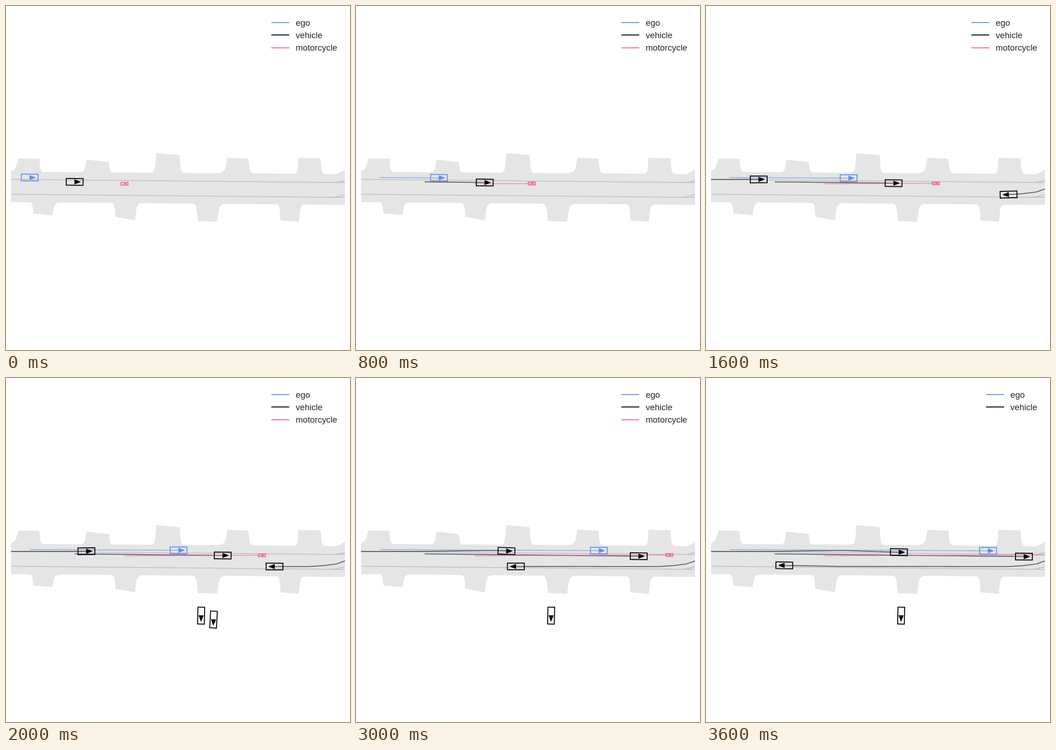
Write an HTML page with a canvas that moves like this. It is 748x748 px and loops after 3800 ms.

```html
<!DOCTYPE html>
<html lang="en">
<head>
<meta charset="utf-8">
<title>Traffic scene</title>
<style>
  html, body { margin: 0; width: 100%; height: 100%; overflow: hidden; background: #fff; }
  canvas { display: block; }
</style>
</head>
<body>
<canvas id="stage" width="748" height="748"></canvas>
<script>
const ctx = document.getElementById('stage').getContext('2d');
const STEP = 200, STEPS = 19, SPAN = 6;
const LEFT = 11, RIGHT = 737;
const BLUE = '#6190e8', BLACK = '#000', PINK = '#f9609f';

const car = { w: 36.6, h: 14.6, color: BLACK };
const bike = { w: 15.2, h: 5.8, color: PINK };

// xs: position at every SPAN steps; route: the line followed across the road.
const movers = [
  { ...car, xs: [149.3, 344, 531.3, 691.3], route: [[149, 382.4], [691, 388.3]] },
  { ...car, xs: [-125.5, 54.5, 235.5, 419.5],
    route: [[-126, 377.5], [150, 377], [294, 375], [387, 378], [420, 378.7]] },
  { ...car, xs: [816, 718.3, 498, 170.3],
    route: [[820, 369], [718, 404.5], [691, 408], [659, 410], [293, 409.7], [170, 407.4]] },
  { ...bike, xs: [257.8, 441.5, 609.5, 745], route: [[258, 386.5], [749, 384.6]] },
  { ...car, color: BLUE, xs: [51.5, 245, 438.3, 613.3], route: [[51, 373], [613, 375.8]] }
];
const parked = [
  { ...car, x: 424.3, y: 516.7, angle: 1.593, until: STEPS },
  { ...car, x: 451.3, y: 525.2, angle: 1.625, until: 15 }
];
const PARKED_FROM = 10;

// Driveways: start on the kerb, two outer corners, end on the kerb.
const kerbTop = x => 360.5 + 0.0066 * x;
const kerbBottom = x => 426.3 + 0.0085 * x;
const above = [
  [-4, 27.5, 331.5, 72.5, 332.3, 82],
  [162, 174.5, 334, 223.5, 339.3, 233],
  [315, 327, 320, 377.5, 324.3, 387],
  [460, 481.5, 330, 527, 332, 539],
  [627, 636, 330.3, 683.7, 331.3, 694]
];
const below = [
  [650, 636.8, 469.3, 597, 466, 588],
  [477, 459, 469, 417.5, 467.5, 404],
  [296, 280.5, 466, 238, 458.5, 229],
  [118, 101, 455, 59.5, 451, 51]
];

function addDriveway(path, kerb, [a, x1, y1, x2, y2, b]) {
  const mix = (p, q, u) => p + (q - p) * u;
  const ya = kerb(a), yb = kerb(b);
  path.lineTo(a, ya);
  path.quadraticCurveTo(mix(a, x1, 0.7), ya, mix(a, x1, 0.82), mix(ya, y1, 0.4));
  path.lineTo(x1, y1);
  path.lineTo(x2, y2);
  path.lineTo(mix(b, x2, 0.82), mix(yb, y2, 0.4));
  path.quadraticCurveTo(mix(b, x2, 0.7), yb, b, yb);
}

const road = new Path2D();
above.forEach(d => addDriveway(road, kerbTop, d));
road.lineTo(714, 366.3);
road.quadraticCurveTo(724, 365, RIGHT, 355.5);
road.lineTo(RIGHT, kerbBottom(RIGHT));
below.forEach(d => addDriveway(road, kerbBottom, d));
road.lineTo(-4, kerbBottom(-4));

const lane = new Path2D('M0 376.9L715 383.7 750 383.8M712 383.7Q726 383.5 743 377');

// Catmull-Rom through evenly spaced values.
function spline(p, s) {
  const last = p.length - 1;
  const get = i => i < 0 ? 3 * p[0] - 3 * p[1] + p[2]
    : i > last ? 3 * p[last] - 3 * p[last - 1] + p[last - 2] : p[i];
  const i = Math.min(last - 1, Math.floor(s)), u = s - i;
  const [a, b, c, d] = [i - 1, i, i + 1, i + 2].map(get);
  return b + u / 2 * (c - a + u * (2 * a - 5 * b + 4 * c - d + u * (3 * (b - c) + d - a)));
}

function yOn(route, x) {
  const dir = Math.sign(route[1][0] - route[0][0]);
  let i = 1;
  while (i < route.length - 1 && (x - route[i][0]) * dir > 0) i++;
  const [x0, y0] = route[i - 1], [x1, y1] = route[i];
  return y0 + (y1 - y0) * (x - x0) / (x1 - x0);
}

function at(m, k) {
  const x = spline(m.xs, k / SPAN);
  return [x, yOn(m.route, x)];
}

function pose(m, k) {
  const [x, y] = at(m, k);
  const [ax, ay] = at(m, Math.max(0, k - 1));
  const [bx, by] = at(m, Math.min(STEPS - 1, k + 1));
  return { x, y, angle: Math.atan2(by - ay, bx - ax) };
}

function drawTrail(m, k) {
  ctx.globalAlpha = 0.58;
  ctx.strokeStyle = m.color;
  ctx.beginPath();
  for (let s = 0; s <= k; s++) ctx.lineTo(...at(m, s));
  ctx.stroke();
  ctx.globalAlpha = 1;
}

function drawAgent({ w, h, color }, { x, y, angle }) {
  const reach = Math.abs(Math.cos(angle)) * w / 2 + Math.abs(Math.sin(angle)) * h / 2;
  ctx.save();
  ctx.translate(x, y);
  ctx.rotate(angle);
  ctx.strokeStyle = ctx.fillStyle = color;
  // The outline shows only when it lies fully inside the view.
  if (x - reach >= LEFT && x + reach <= RIGHT) ctx.strokeRect(-w / 2, -h / 2, w, h);
  ctx.lineWidth = 1;
  ctx.beginPath();
  ctx.moveTo(0, -h / 3);
  ctx.lineTo(w / 3, 0);
  ctx.lineTo(0, h / 3);
  ctx.closePath();
  ctx.fill();
  ctx.stroke();
  ctx.restore();
}

function drawLegend(k) {
  const rows = [['ego', BLUE], ['vehicle', BLACK]];
  if (k < STEPS - 1) rows.push(['motorcycle', PINK]);
  ctx.font = '18.67px "Liberation Sans", Arial, sans-serif';
  const width = Math.max(...rows.map(([label]) => ctx.measureText(label).width));
  const x = Math.round(720.2 - width);
  rows.forEach(([label, color], i) => {
    const y = 36.4 + i * 27.06;
    ctx.fillStyle = color;
    ctx.fillRect(x - 53, Math.round(y) - 1, 39, 2);
    ctx.fillStyle = '#262626';
    ctx.fillText(label, x, Math.round(y + 6.5));
  });
}

function draw(k) {
  ctx.fillStyle = '#fff';
  ctx.fillRect(0, 0, 748, 748);
  ctx.save();
  ctx.beginPath();
  ctx.rect(LEFT, 11, RIGHT - LEFT, 726);
  ctx.clip();
  ctx.fillStyle = '#e5e5e5';
  ctx.fill(road);
  ctx.strokeStyle = '#c3c3c3';
  ctx.lineWidth = 2;
  ctx.stroke(lane);
  ctx.translate(-5, 32.3);
  ctx.stroke(lane);
  ctx.translate(5, -32.3);
  movers.forEach(m => drawTrail(m, k));
  movers.forEach(m => drawAgent(m, pose(m, k)));
  parked.filter(p => k >= PARKED_FROM && k < p.until).forEach(p => drawAgent(p, p));
  ctx.restore();
  drawLegend(k);
}

const start = performance.now();
function tick() {
  const t = Math.max(0, performance.now() - start) % (STEP * STEPS);
  draw(Math.floor(t / STEP));
  requestAnimationFrame(tick);
}
tick();
</script>
</body>
</html>
```
